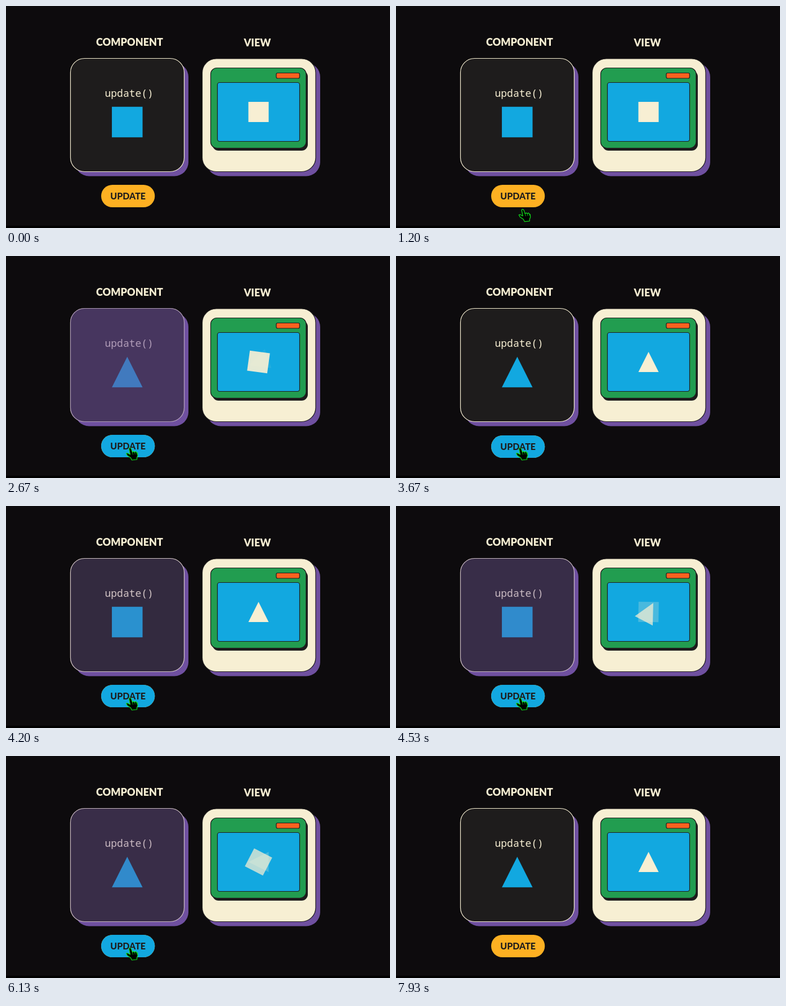
Write an HTML page with a canvas that moves like this. It is 682 px wide and 396 px high and loops after 7990 ms.

```html
<!DOCTYPE html>
<html lang="en">
<head>
<meta charset="utf-8">
<title>Component update</title>
<style>
  html, body { margin: 0; width: 100%; height: 100%; overflow: hidden; background: #0d0b0d; }
  canvas { display: block; }
</style>
</head>
<body>
<canvas id="stage" width="682" height="396"></canvas>
<script>
const ctx = document.getElementById('stage').getContext('2d');

const LOOP = 7990;
const CLICKS = [1875, 3663, 5265];
const MORPH = 450;          // length of one shape swap
const VIEW_DELAY = 725;     // from click to the view's swap
const TURN = 117 * Math.PI / 180;

const COLOR = {
  back: '#0d0b0d', ink: '#1e1c1c', cream: '#f7efd3', purple: '#6f50a0',
  green: '#229d50', blue: '#12a8e0', orange: '#f9611f', amber: '#fdb022'
};

const clamp = x => Math.min(1, Math.max(0, x));
const ramp = (t, from, to) => clamp((t - from) / (to - from));
const ease = x => x * x * (3 - 2 * x);
const mix = (a, b, k) => a + (b - a) * k;

function box(x, y, w, h, r, fill, stroke) {
  ctx.beginPath();
  ctx.roundRect(x, y, w, h, r);
  ctx.fillStyle = fill;
  ctx.fill();
  if (stroke) {
    ctx.strokeStyle = stroke;
    ctx.lineWidth = 1.2;
    ctx.stroke();
  }
}

function label(text, x, y, font, color) {
  ctx.font = font;
  ctx.fillStyle = color;
  ctx.textAlign = 'center';
  ctx.fillText(text, x, y);
}

function shape(kind, x, y, size, angle, alpha, color) {
  if (alpha <= 0) return;
  const h = size / 2;
  ctx.save();
  ctx.translate(x, y);
  ctx.rotate(angle);
  ctx.globalAlpha = alpha;
  ctx.fillStyle = color;
  ctx.beginPath();
  if (kind === 'square') {
    ctx.rect(-h, -h, size, size);
  } else {
    ctx.moveTo(0, -h);
    ctx.lineTo(h, h);
    ctx.lineTo(-h, h);
  }
  ctx.fill();
  ctx.restore();
}

// Both shapes spin together while one fades into the other.
function swap(t, delay, x, y, size, color) {
  const started = CLICKS.filter(c => t >= c + delay);
  const kinds = ['square', 'triangle'];
  const next = kinds[started.length % 2];
  if (!started.length) return shape(next, x, y, size, 0, 1, color);
  const start = started[started.length - 1] + delay;
  const p = ease(ramp(t, start, start + MORPH));
  const previous = kinds[(started.length + 1) % 2];
  shape(previous, x, y, size, TURN * p, clamp(1 - 1.17 * p), color);
  shape(next, x, y, size, TURN * (p - 1), p, color);
}

function flashAlpha(t) {
  return Math.max(...CLICKS.map(c => {
    const s = t - c;
    return 0.75 * Math.min(ramp(s, 450, 700), 1 - ramp(s, 700, 1000));
  }));
}

function component(t) {
  box(122.5, 101.5, 201.5, 202, 25, COLOR.purple);
  box(114.5, 93.5, 202, 202, 25, COLOR.ink, COLOR.cream);
  label('update()', 218.7, 162, '18px "Noto Sans Mono", monospace', COLOR.cream);
  swap(t, 0, 215.3, 207, 54.5, COLOR.blue);
  ctx.globalAlpha = flashAlpha(t);
  box(114, 93, 203, 203, 25, COLOR.purple);
  ctx.globalAlpha = 1;
}

function view(t) {
  box(356.5, 101.5, 201.5, 202, 25, COLOR.purple);
  box(348.5, 94, 201.5, 201.5, 25, COLOR.cream, COLOR.ink);
  box(366.5, 115, 169.5, 143, 11, COLOR.ink);
  box(363.5, 110.5, 169.5, 143, 11, COLOR.green, COLOR.ink);
  box(480, 119.5, 41.5, 9.5, 2.5, COLOR.orange, COLOR.ink);
  box(375.5, 136.5, 146, 105, 4, COLOR.blue, COLOR.ink);
  swap(t, VIEW_DELAY, 448.5, 189, 36, COLOR.cream);
}

function button(t) {
  const hover = Math.min(ramp(t, 1250, 1400), 1 - ramp(t, 7150, 7320));
  const press = Math.max(...CLICKS.map(c => Math.sin(Math.PI * ramp(t, c - 110, c + 110))));
  const y = 319 + 1.1 * press;
  box(169, y, 95.3, 40, 20, COLOR.amber);
  ctx.globalAlpha = hover;
  box(169, y, 95.3, 40, 20, COLOR.blue);
  ctx.globalAlpha = 1;
  label('UPDATE', 216.7, y + 26.2, '800 16px Lato, sans-serif', COLOR.ink);
}

function cursor(t) {
  const away = 1 - ease(ramp(t, 650, 1600)) + ease(ramp(t, 6900, 7600));
  if (away >= 1) return;
  ctx.save();
  ctx.translate(mix(219.5, 232, away), mix(342, 396, away));
  ctx.lineJoin = ctx.lineCap = 'round';
  ctx.fillStyle = '#000';
  ctx.strokeStyle = '#12e01c';
  ctx.lineWidth = 1.2;
  ctx.fill(new Path2D('M0 0'));
  const hand = new Path2D('M-1 2Q-1 0 .5 0T3 2L5 8 7 6.5 9 8 11 6.5 12.5 8.5' +
    ' 14 9 14.5 14 13 18 13 21 4 22 2 18-4 14-6 10-4 9.5 1 12Z');
  ctx.fill(hand);
  ctx.stroke(hand);
  ctx.lineWidth = 0.8;
  ctx.stroke(new Path2D('M5 8l1 4M9 8l.7 3.5M12.5 8.5l.4 3'));
  ctx.restore();
}

function draw(t) {
  ctx.fillStyle = COLOR.back;
  ctx.fillRect(0, 0, 682, 396);
  label('COMPONENT', 219.5, 71, '900 18px Lato, sans-serif', COLOR.cream);
  label('VIEW', 446.5, 72, '900 18px Lato, sans-serif', COLOR.cream);
  component(t);
  view(t);
  button(t);
  cursor(t);
  ctx.fillStyle = '#000';
  ctx.fillRect(0, 392, 682, 4);
}

const begin = performance.now();
function tick() {
  draw((performance.now() - begin) % LOOP);
  requestAnimationFrame(tick);
}
tick();
</script>
</body>
</html>
```
